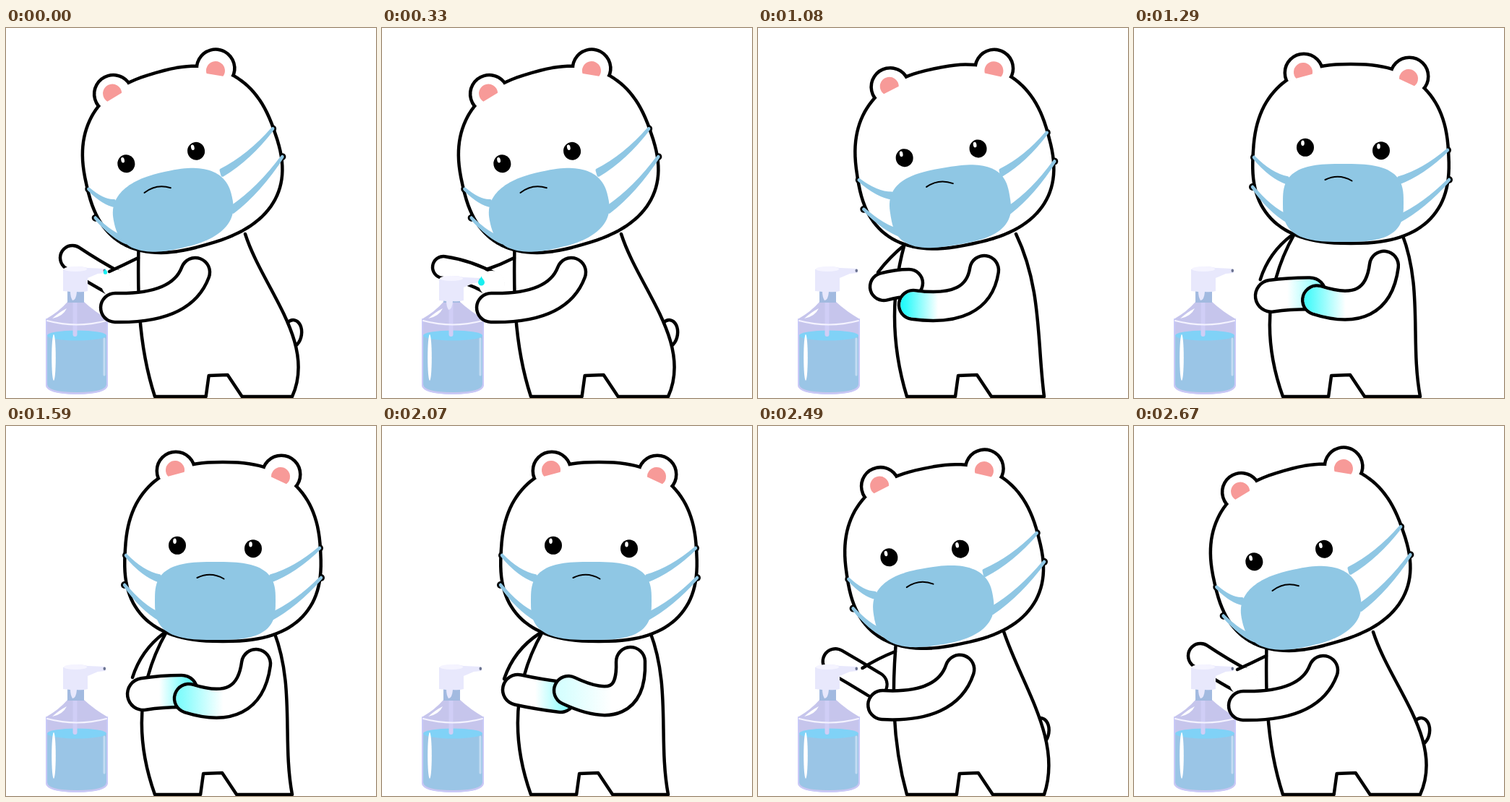
An HTML page with a canvas for the animation above (2700 ms loop, 512 by 512 pixels).

```html
<!DOCTYPE html>
<html lang="en">
<head>
<meta charset="utf-8">
<title>Clean hands</title>
<style>
html, body { margin: 0; width: 100%; height: 100%; overflow: hidden; background: #fff; }
canvas { display: block; width: 512px; height: 512px; }
</style>
</head>
<body>
<canvas id="stage" width="512" height="512"></canvas>
<script>
const ctx = document.getElementById('stage').getContext('2d');
const LOOP = 2700, STEP = 30, LINE = 4.5;
const BLUE = '#8fc7e4', INK = '#000', WHITE = '#fff', PINK = '#f79a98';

// head: x, y, tilt, face turn    torso: left neck, waist, right neck, hip pull, chest pull
// far, near: start, bend, end    girth: far arm radius    shoulder: line from neck to elbow
const sit = {
  head: [242, 182, -16, -17], torso: [184, 185, 331, 430, 355],
  far: [92, 318, 122, 338, 152, 354], girth: [17], shoulder: [183, 318, 143, 337],
  near: [151, 387, 243, 389, 262, 338], pump: [0], reach: [1]
};
const press = { ...sit, far: [85, 331, 120, 336, 152, 354], girth: [15], shoulder: [183, 318, 145, 334], pump: [13] };
const lift = {
  head: [270, 178.5, -12, -6], torso: [207, 189, 357, 386, 393],
  far: [174, 358, 192, 353, 209, 353], girth: [19], shoulder: [203, 300, 166, 338],
  near: [215, 383, 304, 395, 313, 335], pump: [0], reach: [0]
};
const rubA = {
  ...lift, head: [300, 175, 0, 0], torso: [222, 188, 371, 382, 400],
  far: [190, 371, 215, 367, 243, 367], girth: [22], shoulder: [218, 287, 175, 348],
  near: [253, 377, 336, 403, 346, 329]
};
const rubB = {
  ...rubA, far: [188, 365, 215, 371, 247, 375], girth: [21], shoulder: [218, 287, 169, 350],
  near: [258, 366, 347, 408, 344, 326]
};
const back = {
  ...lift, head: [297, 178, 1.5, -7], torso: [217, 199, 368, 396, 397],
  far: [153, 349, 172, 352, 188, 369], shoulder: [211, 294, 149, 329],
  near: [236, 383, 317, 396, 331, 333]
};

const smooth = u => u * u * (3 - 2 * u);
const easeIn = u => u * u;
const easeOut = u => u * (2 - u);

const RUB_START = 1270, RUB = 160;
const rubs = [1, 2, 3, 4, 5].map(i => [RUB_START + i * RUB, i % 2 ? rubB : rubA]);
const keys = [
  [0, sit], [300, press], [720, press], [860, sit],
  [1080, lift, easeIn], [RUB_START, rubA, easeOut], ...rubs,
  [2160, rubB], [2340, back, easeIn], [2640, sit, easeOut], [LOOP, sit]
];

const rise = (t, a, b) => Math.max(0, Math.min(1, (t - a) / (b - a)));

function poseAt(t) {
  const k = keys.findIndex(key => key[0] > t);
  const [t0, from] = keys[k - 1], [t1, to, ease = smooth] = keys[k];
  const u = ease((t - t0) / (t1 - t0)), pose = {};
  for (const part in from) pose[part] = from[part].map((v, i) => v + (to[part][i] - v) * u);
  return pose;
}

function fill(path, color) {
  ctx.fillStyle = color;
  ctx.fill(path);
}

function stroke(path, color = INK, width = LINE) {
  ctx.strokeStyle = color;
  ctx.lineWidth = width;
  ctx.stroke(path);
}

function ellipse(x, y, rx, ry = rx, turn = 0) {
  const path = new Path2D();
  path.ellipse(x, y, rx, ry, turn, 0, 2 * Math.PI);
  return path;
}

// Rounded box of power n; taper widens it towards the bottom.
function squircle(x, y, rx, ry, n, taper = 0) {
  const path = new Path2D();
  const bend = v => Math.sign(v) * Math.abs(v) ** (2 / n);
  for (let i = 0; i < 120; i++) {
    const a = i * Math.PI / 60, v = bend(Math.sin(a));
    path.lineTo(x + rx * bend(Math.cos(a)) * (1 + taper * v), y + ry * v);
  }
  path.closePath();
  return path;
}

function limb([x0, y0, cx, cy, x1, y1], radius) {
  const path = new Path2D(`M${x0} ${y0} Q${cx} ${cy} ${x1} ${y1}`);
  stroke(path, INK, 2 * radius + LINE);
  const inside = 2 * radius - LINE;
  stroke(path, WHITE, inside);
  return { path, inside };
}

function gel({ path, inside }, x0, x1, alpha) {
  const g = ctx.createLinearGradient(x0, 0, x1, 0);
  g.addColorStop(0, `rgba(20,250,250,${alpha})`);
  g.addColorStop(.2, `rgba(20,250,250,${alpha * .85})`);
  g.addColorStop(1, 'rgba(20,250,250,0)');
  stroke(path, g, inside);
}

function drawBody({ torso, head, reach }) {
  const [neckL, waist, neckR, hip, chest] = torso;
  const side = (8 * waist - neckL - 206) / 6;
  const lean = (270 - head[0]) * .13;
  stroke(ellipse(370 + 26 * reach[0], 423, 13, 19, .15));
  const path = new Path2D(`M${neckL} 285 C${side} 360 ${side} 435 206 510
    H${273 + lean} L${277 + lean} 481 L${303 + lean} 480 L${323 + lean} 510
    H396 C${hip} 435 ${chest} 360 ${neckR} 285`);
  fill(path, WHITE);
  stroke(path);
}

function drawFace(turn) {
  for (const s of [-1, 1]) {
    const x = s * (52.5 + turn * .2), y = s * 2.2 - 37;
    fill(ellipse(x, y, 12, 12.5), INK);
    fill(ellipse(x - 3.5, y - 6, 2.3, 3.8), WHITE);
  }
  fill(squircle(0, 37.5, 83.5, 54, 3 + turn * .03), BLUE);
  const x = turn * .5;
  stroke(new Path2D(`M${x - 25} 5.5 Q${x - 6} -3.5 ${x + 12} 7`), INK, 2);
}

function drawHead([x, y, tilt, turn]) {
  const rad = tilt * Math.PI / 180;
  const face = [turn - 10.5, 29.5 + turn * .17];
  ctx.save();
  ctx.translate(x, y);
  ctx.rotate(rad);

  const shapes = [ellipse(-65, -113, 24), ellipse(81, -108, 24), squircle(0, -1, 133, 121.7, 2.5, .05)];
  const ends = [];
  for (const s of [-1, 1]) for (const row of [0, 1]) ends.push([s, row, s * (134 + 2 * row), row * 41 - 1 - s * 5]);
  for (const [, , ex, ey] of ends) fill(ellipse(ex, ey, 5), INK);
  for (const shape of shapes) stroke(shape, INK, 2 * LINE);
  for (const shape of shapes) fill(shape, WHITE);

  for (const [ex, ey, slant] of [[-66, -114, -.25], [80, -105, .45]]) {
    const inner = new Path2D();
    inner.arc(ex, ey, 13, slant + 2.65, slant + 6.75);
    fill(inner, PINK);
  }

  // Straps widen towards the mask.
  for (const [s, row, ex, ey] of ends) {
    const mx = face[0] + s * 77, my = face[1] + 6 + row * 53;
    const cx = (ex + mx) / 2, cy = (ey + my) / 2 + 9;
    const strap = new Path2D(`M${ex} ${ey} Q${cx} ${cy - 1} ${mx} ${my - 3} V${my + 4} Q${cx} ${cy + 3} ${ex} ${ey}`);
    fill(strap, BLUE);
    stroke(strap, BLUE, 4.5);
  }

  ctx.translate(...face);
  ctx.rotate(-.2 * rad);
  drawFace(turn);
  ctx.restore();
}

function drawFarArm({ far, girth, shoulder, reach }, alpha) {
  const arm = limb(far, girth[0]);
  gel(arm, 262, 212, alpha);
  // While reaching, the forearm runs into the upper arm without an edge.
  fill(ellipse(far[4], far[5], (girth[0] + 3) * reach[0]), WHITE);
  const [x0, y0, x1, y1] = shoulder;
  const dx = x1 - x0, dy = y1 - y0, len = Math.hypot(dx, dy);
  const bow = (len - 45) * .4 / len;
  stroke(new Path2D(`M${x0} ${y0} Q${(x0 + x1) / 2 - dy * bow} ${(y0 + y1) / 2 + dx * bow} ${x1} ${y1}`));
}

function drawBottle(push) {
  fill(new Path2D('M85 379 H108 Q122 392 141 403 V494 Q140 506 98 507 Q55 506 55 494 V403 Q74 392 85 379Z'), '#c6c5ec');
  fill(new Path2D('M57 425 H139 V493 Q138 504 98 504 Q58 504 57 493Z'), '#9ac5e6');
  fill(ellipse(98, 425.5, 41, 7), '#80d2f7');
  stroke(new Path2D('M95.5 380 V424'), '#d0cef6', 6);
  stroke(new Path2D('M56 403 V494 Q57 506 98 506 Q139 506 140 494 V403'), '#c9c9f8', 2);
  stroke(new Path2D('M57 405 Q98 416 139 405'), '#f4f3ff', 2);
  fill(new Path2D('M64 402 Q74 393 84 388 Q79 399 64 402Z'), WHITE);
  fill(ellipse(66, 456, 2.8, 32), WHITE);
  stroke(new Path2D('M136 430 V480'), '#c3dcf2', 3);
  fill(new Path2D('M85 364 H108 V380 H85Z'), '#a2bae0');
  ctx.save();
  ctx.translate(0, push);
  fill(new Path2D('M79 334 Q97 327 113 332 L136 333 Q140 336 137 339 L127 340 L113 346 V364 Q106 366 98 365 Q97 377 92 377 Q89 372 89 365 L79 364Z'), '#e8e8fc');
  fill(ellipse(96, 333.5, 16, 3.6), '#f5f4ff');
  fill(ellipse(136.3, 335.7, 1.8, 2.2), '#6b7390');
  ctx.restore();
}

function drawDrop(t, push) {
  const tip = 338 + push, size = 2.6 + 3.4 * rise(t, 0, 600);
  ctx.save();
  ctx.globalAlpha = 1 - rise(t, 710, 780);
  ctx.translate(137.5, tip + (379 - tip) * rise(t, 300, 500) ** 2);
  ctx.scale(size, size);
  fill(new Path2D('M0 -1.9 C.2 -1.1 1 -.7 1 .1 A1 1 0 1 1 -1 .1 C-1 -.7 -.2 -1.1 0 -1.9Z'), '#18eff0');
  ctx.restore();
}

function draw(t) {
  const pose = poseAt(t), push = pose.pump[0];
  ctx.fillStyle = WHITE;
  ctx.fillRect(0, 0, 512, 512);
  ctx.lineJoin = ctx.lineCap = 'round';

  drawBody(pose);
  drawHead(pose.head);
  drawFarArm(pose, .75 * rise(t, 1150, 1350) * (1 - rise(t, 2000, 2250)));
  drawBottle(push);

  const hand = pose.near[0] - 20;
  gel(limb(pose.near, 20), hand, hand + 44 + 36 * rise(t, 690, 2070),
    rise(t, 480, 660) * (1 - rise(t, 1080, 2300)));
  drawDrop(t, push);
}

const start = performance.now();
function tick() {
  const t = (performance.now() - start) % LOOP;
  draw(Math.floor(t / STEP) * STEP);
  requestAnimationFrame(tick);
}
tick();
</script>
</body>
</html>
```
